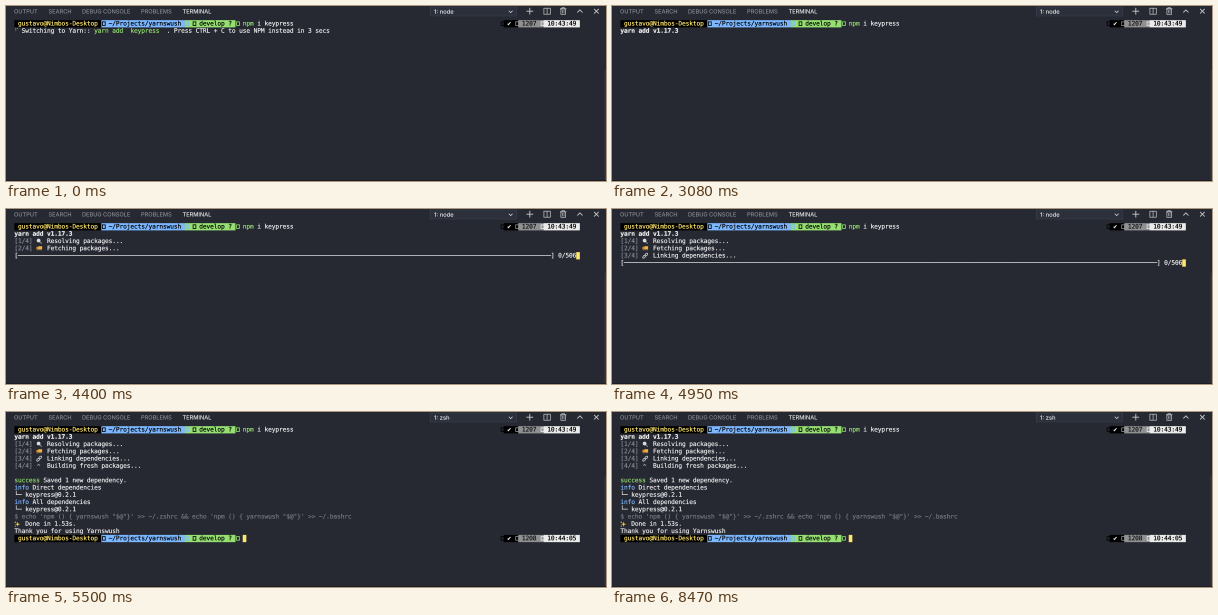
Animation of 600x175 px, one loop 8.58 s. Source, as an HTML page with a canvas:

```html
<!DOCTYPE html>
<html lang="en">
<head>
<meta charset="utf-8">
<title>Terminal: installing a package</title>
<style>
  html, body { margin: 0; width: 600px; height: 175px; overflow: hidden; background: #262931; }
  canvas { display: block; width: 600px; height: 175px; }
</style>
</head>
<body>
<canvas id="stage" width="600" height="175"></canvas>
<script>
const W = 600, H = 175, LOOP = 8580, STEP = 110, SS = 4;
const CW = 3.625, RH = 7.25, LEFT = 8.35, TOP = 14.15, COLS = 156;
const MONO = '"DejaVu Sans Mono", "DejaVu Sans", monospace';
const SANS = 'Inter, Roboto, sans-serif';
const C = {
  bg: '#262931', text: '#ececee', dim: '#858890', faint: '#74777f', black: '#000',
  yellow: '#ffe66d', blue: '#7cb7ff', green: '#96e072', gray: '#8f9092',
  white: '#ececec', spin: '#94857a'
};

// Times at which each stage of the session begins
const AT = { yarn: 2970, resolve: 3300, spin: 3520, name: 3630, fetch: 4180,
             link: 4510, bar: 5060, build: 5170, done: 5280, shell: 5390 };

const out = document.getElementById('stage').getContext('2d');
const big = document.createElement('canvas');
big.width = W * SS;
big.height = H * SS;
const g = big.getContext('2d');

const colX = c => LEFT + c * CW;
const rowY = r => TOP + r * RH;

function rect(x, y, w, h, color) {
  g.fillStyle = color;
  g.fillRect(x, y, w, h);
}

function line(color, width, ...pts) {
  g.strokeStyle = color;
  g.lineWidth = width;
  g.beginPath();
  pts.forEach(([x, y], i) => i ? g.lineTo(x, y) : g.moveTo(x, y));
  g.stroke();
}

function frame(x, y, w, h, color, width) {
  g.strokeStyle = color;
  g.lineWidth = width;
  g.strokeRect(x, y, w, h);
}

function dot(x, y, r, color) {
  g.fillStyle = color;
  g.beginPath();
  g.arc(x, y, r, 0, 7);
  g.fill();
}

function label(text, x, y, size, color) {
  g.font = '500 ' + size + 'px ' + SANS;
  g.fillStyle = color;
  g.fillText(text, x, y);
}

// Writes text cell by cell and returns the next column
function put(row, col, text, color = C.text, bold = false) {
  g.font = (bold ? 'bold ' : '') + '6.2px ' + MONO;
  for (const ch of text) {
    const x = colX(col++), y = rowY(row);
    if (ch === '▯') frame(x + 1.1, y + 1.7, 2.8, 3.6, color, 0.8);
    else if (ch !== ' ') {
      g.fillStyle = g.strokeStyle = color;
      g.lineWidth = 0.18;
      g.fillText(ch, x, y + 5.3);
      g.strokeText(ch, x, y + 5.3);
    }
  }
  return col;
}

function runs(row, ...parts) {
  let col = 0;
  for (const [text, color, bold] of parts) col = put(row, col, text, color, bold);
  return col;
}

function band(row, from, to, color) {
  rect(colX(from), rowY(row), (to - from) * CW, RH, color);
}

function cursor(row, col) {
  band(row, col, col + 1, C.yellow);
}

function prompt(row, num, clock) {
  band(row, 0, 24, C.black);
  band(row, 24, 47, C.blue);
  band(row, 47, 61, C.green);
  runs(row,
    [' gustavo@Nimbos-Desktop ', C.yellow],
    ['▯ ~/Projects/yarnswush ', C.black],
    ['▯', C.blue], [' ▯ develop ? ', C.black],
    ['▯', C.green]);
  band(row, 135, 139, C.black);
  band(row, 139, 146, C.gray);
  band(row, 146, 156, C.white);
  put(row, 134, '▯', C.black);
  put(row, 136, '✔', C.white);
  put(row, 138, '▯', C.gray);
  put(row, 140, num, '#111');
  put(row, 145, '▯', C.white);
  put(row, 147, clock, C.black);
}

function ring(x, y, color) {
  g.strokeStyle = color;
  g.lineWidth = 0.8;
  g.beginPath();
  g.ellipse(x, y, 1.7, 1, -Math.PI / 4, 0, 7);
  g.stroke();
}

const icons = [
  (x, y) => {
    line('#8d8f94', 1, [x + 3.6, y + 4], [x + 5.6, y + 6]);
    dot(x + 2.5, y + 2.9, 1.9, '#d9dde0');
  },
  (x, y) => {
    rect(x + 0.3, y + 1.9, 1.8, 2.8, '#d98c2b');
    rect(x + 2.2, y + 1.3, 3.8, 3.4, '#f0b040');
    dot(x + 1.6, y + 5.1, 0.8, '#5a5048');
    dot(x + 4.7, y + 5.1, 0.8, '#5a5048');
  },
  (x, y) => {
    ring(x + 2, y + 4.6, '#c9ced4');
    ring(x + 4.2, y + 2.4, '#c9ced4');
  },
  (x, y) => line('#a9a7a4', 0.8, [x + 1.2, y + 3.2], [x + 2.5, y + 1.9], [x + 3.9, y + 3.2])
];

function task(n, text) {
  const row = n + 1;
  put(row, 0, `[${n}/4]`, C.dim);
  icons[n - 1](colX(6), rowY(row));
  put(row, 9, text);
}

function bar(row, part, total) {
  const tail = `] ${Math.floor(part * total)}/${total}`;
  const room = COLS - 2 - tail.length;
  const full = Math.floor(room * part);
  put(row, 0, '[' + '#'.repeat(full) + '─'.repeat(room - full) + tail);
  cursor(row, COLS - 1);
}

function sparkle(x, y, r) {
  g.fillStyle = '#f5c542';
  g.beginPath();
  for (let i = 0; i < 8; i++) {
    const a = i * Math.PI / 4, d = i % 2 ? r * 0.35 : r;
    g.lineTo(x + d * Math.sin(a), y - d * Math.cos(a));
  }
  g.fill();
}

function header(t) {
  const tabs = [['OUTPUT', 8], ['SEARCH', 42.5], ['DEBUG CONSOLE', 76], ['PROBLEMS', 135]];
  for (const [name, x] of tabs) label(name, x, 7.5, 5.65, '#8b8d94');
  label('TERMINAL', 176.5, 7.5, 5.65, '#f0f0f2');

  rect(424, 0.8, 87, 9.4, '#2b303b');
  frame(424.2, 1, 86.6, 9, '#3d4352', 0.5);
  label(t < AT.shell ? '1: node' : '1: zsh', 428, 7.7, 5.8, '#f4f4f4');
  const ink = '#c8c9cc';
  line(ink, 0.8, [502.8, 4.7], [504.7, 6.6], [506.6, 4.7]);

  line(ink, 0.9, [520.4, 5.2], [527.2, 5.2]);
  line(ink, 0.9, [523.8, 1.8], [523.8, 8.6]);
  frame(537.9, 2.2, 6.4, 6, ink, 0.7);
  line(ink, 0.7, [541.1, 2.2], [541.1, 8.2]);
  line(ink, 0.8, [554, 2.8], [560.4, 2.8]);
  line(ink, 0.7, [555.9, 2.6], [555.9, 1.7], [558.5, 1.7], [558.5, 2.6]);
  frame(554.9, 3, 4.6, 5.3, ink, 0.7);
  line(ink, 0.6, [556.4, 4], [556.4, 7.3]);
  line(ink, 0.6, [558, 4], [558, 7.3]);
  line(ink, 0.9, [571.3, 6.5], [573.9, 3.9], [576.5, 6.5]);
  line(ink, 0.9, [588.1, 2.9], [592.7, 7.5]);
  line(ink, 0.9, [592.7, 2.9], [588.1, 7.5]);
}

function waiting(t) {
  const spin = '⠋⠙⠹⠸⠼⠴⠦⠧⠇⠏'[Math.floor(t / 80) % 10];
  runs(1, [spin + ' ', C.spin], ['Switching to Yarn:: '],
    ['yarn add  keypress ', C.green],
    [' . Press CTRL + C to use NPM instead in 3 secs']);
}

function install(t) {
  put(1, 0, 'yarn add v1.17.3', C.text, true);
  if (t >= AT.resolve) task(1, 'Resolving packages...');
  if (t >= AT.fetch) task(2, 'Fetching packages...');
  if (t >= AT.link) task(3, 'Linking dependencies...');
  if (t >= AT.build) task(4, 'Building fresh packages...');

  if (t >= AT.done) summary();
  else if (t >= AT.link && t < AT.build) bar(5, t < AT.bar ? 0 : 0.6, 506);
  else if (t >= AT.fetch && t < AT.link) bar(4, 0, 506);
  else if (t >= AT.spin && t < AT.fetch) {
    const spin = '⠁⠂⠄⡀⢀⠠⠐⠈'[Math.floor((t - AT.spin) / 60 + 1) % 8];
    put(3, 0, spin, C.spin);
    if (t >= AT.name) cursor(3, put(3, 2, 'keypress'));
  }
}

function summary() {
  const call = `echo 'npm () { yarnswush "$@"}' >> ~/.`;
  runs(7, ['success', C.green], [' Saved 1 new dependency.']);
  runs(8, ['info', C.blue], [' Direct dependencies']);
  put(9, 0, '└─ keypress@0.2.1');
  runs(10, ['info', C.blue], [' All dependencies']);
  put(11, 0, '└─ keypress@0.2.1');
  put(12, 0, `$ ${call}zshrc && ${call}bashrc`, C.faint);
  sparkle(11.6, rowY(13) + 3.8, 2.6);
  sparkle(9.2, rowY(13) + 1.8, 1.2);
  sparkle(9.3, rowY(13) + 5.7, 1);
  put(13, 3, 'Done in 1.53s.');
  put(14, 0, 'Thank you for using Yarnswush');
  prompt(15, '1208', '10:44:05');
  cursor(15, 63);
}

function draw(t) {
  g.setTransform(SS, 0, 0, SS, 0, 0);
  rect(0, 0, W, H, C.bg);
  header(t);
  prompt(0, '1207', '10:43:49');
  put(0, put(0, 63, 'npm', C.green), ' i keypress');
  if (t < AT.yarn) waiting(t);
  else install(t);
  rect(598.6, 64, 1.4, 110, '#343842');
  rect(0, 174, W, 1, '#1b1d23');
  out.imageSmoothingEnabled = true;
  out.imageSmoothingQuality = 'high';
  out.drawImage(big, 0, 0, W, H);
}

const start = performance.now();
let last = -1;
function tick() {
  const t = (performance.now() - start) % LOOP;
  const step = Math.floor(t / STEP);
  if (step !== last) draw((last = step) * STEP);
  requestAnimationFrame(tick);
}
tick();
</script>
</body>
</html>
```
